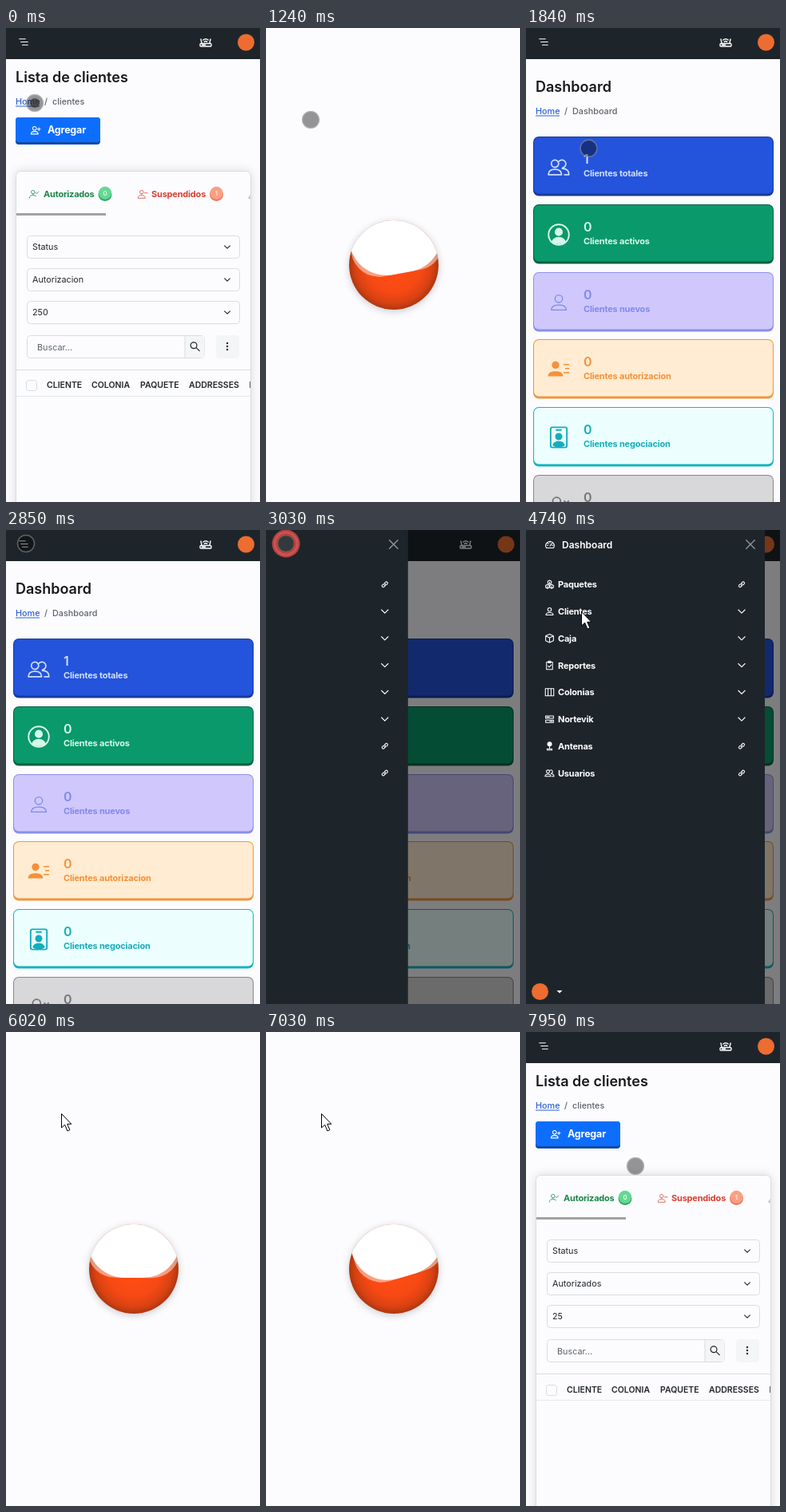
An HTML page with a canvas for the animation above (8000 ms loop, 318 by 594 pixels).

```html
<!DOCTYPE html>
<html lang="es">
<head>
<meta charset="utf-8">
<title>Clientes</title>
<style>
html, body { margin: 0; width: 318px; height: 594px; overflow: hidden; background: #fcfcff; }
canvas { display: block; width: 318px; height: 594px; }
</style>
</head>
<body>
<canvas id="stage"></canvas>
<script>
const W = 318, H = 594, LOOP = 8000;
const cv = document.getElementById('stage'), c = cv.getContext('2d');
const dpr = window.devicePixelRatio || 1;
cv.width = W * dpr;
cv.height = H * dpr;

const BG = '#fcfcff', DARK = '#1d252b', INK = '#212529', EDGE = '#d9dce0', PALE = '#f4f5f7', MARK = '#ee6c30';

const ICONS = {
  person: 'M8 8a3 3 0 1 0 0-6a3 3 0 0 0 0 6zM2 14c0-3 2.5-4 6-4s6 1 6 4z',
  people: 'M5.3 8.3a2.6 2.6 0 1 0 0-5.2a2.6 2.6 0 0 0 0 5.2zM.6 13.6c0-2.8 1.8-3.8 4.7-3.8s4.7 1 4.7 3.8zM8.2 4a2.8 2.8 0 1 1 2.6 4.600M10.500 9.200c3 0 4.800 1.200 4.800 4.400h-3.200',
  check: 'M6.5 8a2.8 2.8 0 1 0 0-5.6a2.8 2.8 0 0 0 0 5.6zM1 14c0-3 2-4 5.5-4c2 0 3.5 .4 4.5 1.2M10.5 6l1.5 1.5l3-3',
  minus: 'M6.5 8a2.8 2.8 0 1 0 0-5.6a2.8 2.8 0 0 0 0 5.6zM1 14c0-3 2-4 5.5-4s5.5 1 5.5 4zM11 6.5h4.5',
  plus: 'M6.5 8a2.8 2.8 0 1 0 0-5.6a2.8 2.8 0 0 0 0 5.6zM1 14c0-3 2-4 5.5-4s5.5 1 5.5 4zM11 6.5h4.5M13.2 4.2v4.5',
  cross: 'M6.5 8a2.8 2.8 0 1 0 0-5.6a2.8 2.8 0 0 0 0 5.6zM1 14c0-3 2-4 5.5-4s5.5 1 5.5 4zM12 5l3 3M15 5l-3 3',
  ring: 'M15.3 8a7.3 7.3 0 1 0-14.6 0a7.3 7.3 0 0 0 14.6 0z',
  bust: 'M8 9a3 3 0 1 0 0-6a3 3 0 0 0 0 6zM2.8 13.4c.7-2.6 2.5-3.6 5.2-3.6s4.5 1 5.2 3.6c-2.8 2.2-7.6 2.2-10.4 0z',
  badge: 'M3.4 .8h9.2q1.2 0 1.2 1.2v12q0 1.200-1.200 1.200h-9.200q-1.200 0-1.200-1.200v-12q0-1.200 1.200-1.200zM6.300 2.700h3.400',
  gauge: 'M2.5 13a6.5 6.5 0 1 1 11 0zM8 10l3-4M8 3.5v1.5M3.5 9h1.5M11.5 9h1.5M4.8 5.5l1 1',
  boxes: 'M8 1l3 1.5v3.5l-3 1.5l-3-1.5v-3.5zM4.5 8l3 1.5v3.5l-3 1.5l-3-1.5v-3.5zM11.5 8l3 1.5v3.5l-3 1.5l-3-1.5v-3.5zM4.5 11v3M11.5 11v3M8 4v3',
  box: 'M8 1l6.5 3v8l-6.5 3l-6.5-3v-8zM1.5 4l6.5 3l6.5-3M8 7v8',
  clip: 'M3 2.5h10v12.5h-10zM6 1h4v3h-4zM5.5 9l2 2l3.5-4',
  map: 'M1 2h14v12h-14zM5.5 2v12M10.5 2v12',
  server: 'M1.5 2.500h13v4h-13zM1.500 9.500h13v4h-13zM3.500 4.500h4M8.500 11.500h4',
  pole: 'M8 7v5M4 12.5h8v2h-8z',
  link: 'M7 9.5a2.8 2.8 0 0 1 0-4l2.5-2.5a2.8 2.8 0 0 1 4 4l-1.5 1.5M9 6.5a2.8 2.8 0 0 1 0 4l-2.5 2.5a2.8 2.8 0 0 1-4-4l1.5-1.5',
  chev: 'M2 5l6 6l6-6',
  close: 'M2 2l12 12M14 2l-12 12',
  menu: 'M1 3h10M3.5 8h11.5M6 13h9',
  router: 'M2 10.500h12q1 0 1 1v1.500q0 1-1 1h-12q-1 0-1-1v-1.500q0-1 1-1zM3.500 12.300h4M3 10l-1-5M13 10l1-5M6.300 8.300a2.500 2.500 0 0 1 3.400 0M4.800 6a5 5 0 0 1 6.400 0',
  lens: 'M11 6.5a4.8 4.8 0 1 0-9.6 0a4.8 4.8 0 0 0 9.6 0zM10 10l5 5'
};
for (const k in ICONS) ICONS[k] = new Path2D(ICONS[k]);
const ARROW = new Path2D('M0 0V17.5L4.2 13.8L7.4 21.5L10.4 20.2L7.2 12.8H12.3Z');

const clamp = v => Math.max(0, Math.min(1, v));
const ease = v => { v = clamp(v); return v * v * (3 - 2 * v); };

function text(s, x, y, size, weight, col, align = 'left') {
  c.font = `${weight} ${size}px Inter, sans-serif`;
  // bold interface labels are set slightly tight
  c.letterSpacing = weight == 700 ? '-0.2px' : '0px';
  c.textAlign = align;
  c.fillStyle = col;
  c.fillText(s, x, y);
}
function icon(name, x, y, size, col, lw = 1.3, fill = false) {
  c.save();
  c.translate(x - size / 2, y - size / 2);
  c.scale(size / 16, size / 16);
  c.lineWidth = lw;
  c.lineCap = c.lineJoin = 'round';
  c.strokeStyle = c.fillStyle = col;
  if (fill) c.fill(ICONS[name]); else c.stroke(ICONS[name]);
  c.restore();
}
function rect(x, y, w, h, col) {
  c.fillStyle = col;
  c.fillRect(x, y, w, h);
}
function round(x, y, w, h, r, fill, stroke) {
  c.beginPath();
  c.roundRect(x, y, w, h, r);
  if (fill) { c.fillStyle = fill; c.fill(); }
  if (stroke) { c.strokeStyle = stroke; c.lineWidth = 1; c.stroke(); }
}
function disc(x, y, r, col) {
  c.beginPath();
  c.arc(x, y, r, 0, 7);
  c.fillStyle = col;
  c.fill();
}

function shell() {
  rect(0, 0, W, H, BG);
  rect(0, 0, W, 39, DARK);
  icon('menu', 22, 17.5, 12, '#ffffff', 1.5);
  icon('router', 250, 17, 16, '#ffffff', 1.4);
  disc(300.5, 18, 10.5, MARK);
}
function crumbs(title, last, ty, by) {
  text(title, 12, ty, 18, 600, '#16181c');
  text('Home', 12, by, 10.8, 500, '#2f62d8');
  rect(12, by + 1.5, 30, 1, '#2f62d8');
  text('/', 48, by, 10.8, 500, '#5c636a');
  text(last, 58, by, 10.8, 500, '#5c636a');
}

function badge(x, label, light, deep) {
  disc(x, 208.5, 8.5, deep);
  disc(x, 206.8, 8, light);
  text(label, x, 209.7, 8, 500, '#ffffff', 'center');
}
function select(y, label) {
  round(26.5, y + .5, 266, 28, 4, BG, EDGE);
  text(label, 33, y + 18.3, 10.8, 400, INK);
  icon('chev', 277, y + 14.5, 9, INK, 2);
}
function listPage(status, size, shift) {
  shell();
  crumbs('Lista de clientes', 'clientes', 68, 96);
  round(12, 112, 106, 34, 4, '#0b4aa8');
  round(12, 112, 106, 31, 4, '#0d6efd');
  icon('plus', 37, 128, 13, '#ffffff');
  text('Agregar', 52, 132.2, 12.5, 700, '#ffffff');

  c.save();
  c.shadowColor = 'rgba(0,0,0,.15)';
  c.shadowBlur = 13 * dpr;
  round(12.5, 179.5, 294, 440, 6, BG);
  c.restore();
  round(12.5, 179.5, 294, 440, 6, BG, EDGE);

  c.save();
  c.beginPath();
  c.rect(13, 180, 293, H);
  c.clip();
  icon('check', 35, 208, 13, '#3f9a6c', 1.2);
  text('Autorizados', 47, 212, 11, 700, '#198745');
  badge(124, '0', '#62d992', '#2fa866');
  icon('minus', 171, 208, 13, '#de6a5c', 1.2);
  text('Suspendidos', 182, 212, 11, 700, '#dc4030');
  badge(263.5, '1', '#fb9f82', '#ea7a5e');
  icon('person', 309, 208, 13, '#9a9da0', 1.2);
  rect(13, 232, 112, 3, '#a2a2a2');

  select(260, 'Status');
  select(301, status);
  select(342, size);
  round(26.5, 385.5, 222, 28, 4, BG, EDGE);
  rect(224, 386, 24.5, 27, PALE);
  rect(223.5, 386, 1, 27, EDGE);
  text('Buscar...', 39, 404, 10.8, 400, '#5c636a');
  icon('lens', 236.5, 399, 13, INK, 1.5);
  round(263, 385, 29, 29, 4, PALE);
  for (let i = -1; i < 2; i++) disc(277, 399 + i * 4, 1.2, INK);

  rect(13, 428, 293, 1, EDGE);
  rect(13, 461, 293, 1, '#e6e8ea');
  round(25.5, 441.5 + shift, 13, 13, 3, BG, EDGE);
  const heads = { CLIENTE: 51, COLONIA: 107, PAQUETE: 168, ADDRESSES: 229, IP: 304.5 };
  for (const h in heads) text(h, heads[h], 451.2 + shift, 10.5, 600, INK);
  c.restore();
}

// number, label, fill, edge, ink
const CARDS = [
  ['1', 'totales', '#2453dc', '#183a9c', '#cfdfff'],
  ['0', 'activos', '#0a996a', '#06603f', '#d6f7ea'],
  ['0', 'nuevos', '#d0c8fc', '#8a90e8', '#8289ee'],
  ['0', 'autorizacion', '#ffecd2', '#f0963c', '#f5903a'],
  ['0', 'negociacion', '#ecfffe', '#14b4c4', '#12aebd'],
  ['0', 'suspendidos', '#d8d8da', '#86878c', '#74757c']
];
function dashboard(dim) {
  shell();
  crumbs('Dashboard', 'Dashboard', 80, 108);
  CARDS.forEach(([num, name, fill, edge, ink], i) => {
    const y = Math.round(136 + i * 84.75), x = 41, my = y + 38;
    round(9, y, 301, 74.5, 7, edge);
    round(10, y + 1, 299, 70.5, 6, fill);
    text(num, 72, y + 34, 16, 600, ink);
    text('Clientes ' + name, 72, y + 50, 11, 700, ink);
    if (i == 0) icon('people', x, my, 28, ink, 1);
    if (i == 1) {
      icon('ring', x, my, 28, ink, 1.1);
      icon('bust', x, my, 27, ink, 1, true);
    }
    if (i == 2) icon('person', x, my, 25, ink, .9);
    if (i == 3) {
      icon('person', 37, my - 1, 25, ink, 1, true);
      rect(47, my - 7, 7, 1.5, ink);
      rect(49, my - 2, 5, 1.5, ink);
      rect(47, my + 3, 7, 1.5, ink);
    }
    if (i == 4) {
      icon('badge', x, my, 28, ink, 1.1);
      icon('bust', x, my + 2, 24, ink, 1, true);
    }
    if (i == 5) icon('cross', x, my, 28, ink, 1);
  });
  rect(0, 0, W, H, `rgba(0,0,0,${dim / 2})`);
}

const MENU = [
  ['Paquetes', 'boxes', 1], ['Clientes', 'person'], ['Caja', 'box'], ['Reportes', 'clip'],
  ['Colonias', 'map'], ['Nortevik', 'server'], ['Antenas', 'pole', 1], ['Usuarios', 'people', 1]
];
function sidebar(open) {
  const ink = '#ffffff';
  c.save();
  c.translate(-299 * (1 - open), 0);
  rect(0, 0, 299, H, DARK);
  icon('gauge', 30, 18.5, 13, ink);
  text('Dashboard', 45, 23, 12, 600, ink);
  icon('close', 281, 18, 14, '#92979b', 1.6);
  MENU.forEach(([name, ic, link], i) => {
    const y = 68.3 + i * 33.75;
    icon(ic, 29.5, y, 12, ink, 1.4);
    if (ic == 'pole') disc(29.5, y - 2.5, 3, ink);
    text(name, 40, y + 4, 11, 700, ink);
    if (link) icon('link', 270, y, 9, ink, 1.9);
    else icon('chev', 270, y, 11, ink, 1.6);
  });
  disc(17.5, 578.5, 10.5, MARK);
  c.beginPath();
  c.moveTo(38.5, 577);
  c.lineTo(45.5, 577);
  c.lineTo(42, 580.5);
  c.fillStyle = ink;
  c.fill();
  c.restore();
}

function tile(angle, curve, col) {
  c.save();
  c.translate(160, 250);
  c.rotate(angle);
  round(-58, -58, 116, 116, 116 * curve, col);
  c.restore();
}
function loader(age) {
  rect(0, 0, W, H, BG);
  c.save();
  c.shadowColor = 'rgba(0,0,0,.2)';
  c.shadowBlur = 10 * dpr;
  c.shadowOffsetY = 2 * dpr;
  disc(160, 297, 56, '#ffffff');
  c.restore();
  c.save();
  c.beginPath();
  c.arc(160, 297, 56, 0, 7);
  c.clip();
  const g = c.createRadialGradient(160, 297, 12, 160, 297, 57);
  g.addColorStop(0, '#ff4c14');
  g.addColorStop(.5, '#f64914');
  g.addColorStop(.8, '#d94212');
  g.addColorStop(1, '#a83610');
  rect(100, 240, 120, 120, g);
  const turn = Math.PI * 2 * age / 5000;
  tile(turn, .3, 'rgba(255,245,240,.5)');
  tile(turn, .4, '#ffffff');
  c.restore();
}

const PATH = [
  [0, 36, 94], [400, 36, 94], [1240, 56, 115], [1700, 84, 163], [2480, 20, 22], [2620, 20, 22],
  [2800, 25, 17], [3120, 25, 17], [3400, 59, 106], [3450, 70, 117], [3680, 70, 117],
  [3980, 83, 106], [4330, 66, 97], [4740, 66, 97], [7700, 69, 102], [7950, 137, 168], [LOOP, 137, 168]
];
function place(t) {
  let i = 1;
  while (i < PATH.length - 1 && t > PATH[i][0]) i++;
  const [t0, x0, y0] = PATH[i - 1], [t1, x1, y1] = PATH[i], k = ease((t - t0) / (t1 - t0));
  return [x0 + (x1 - x0) * k, y0 + (y1 - y0) * k];
}
function ripple(x, y, age) {
  if (age < 0 || age > 330) return;
  if (age < 50) return disc(x, y, 6, 'rgba(50,50,50,.7)');
  c.save();
  c.globalAlpha = 1 - clamp((age - 190) / 140);
  disc(x, y, 11, 'rgba(110,110,110,.4)');
  c.beginPath();
  c.arc(x, y, 14 * clamp(age / 130), 0, 7);
  c.lineWidth = 7;
  c.strokeStyle = '#b8403f';
  c.stroke();
  c.lineWidth = 3;
  c.strokeStyle = '#c95452';
  c.stroke();
  c.restore();
}
function pointer(t) {
  if (t >= 4740 && t < 7720) {
    c.save();
    c.translate(69.5, 102.5);
    c.fillStyle = '#ffffff';
    c.strokeStyle = '#000000';
    c.lineWidth = 1;
    c.fill(ARROW);
    c.stroke(ARROW);
    c.restore();
    return;
  }
  const [x, y] = place(t);
  c.save();
  c.globalCompositeOperation = 'multiply';
  disc(x, y, 11, '#969696');
  c.restore();
  c.beginPath();
  c.arc(x, y, 10.5, 0, 7);
  c.lineWidth = 1.5;
  c.strokeStyle = 'rgba(205,205,205,.4)';
  c.stroke();
  ripple(x, y, t + 20);
  ripple(x, y, t - 2890);
  // the last press stays frozen until the arrow takes over
  if (t < 4740) ripple(x, y, Math.min(t - 4310, 140));
}

function draw(t) {
  c.setTransform(dpr, 0, 0, dpr, 0, 0);
  if (t < 130) listPage('Autorizacion', '250', 0);
  else if (t < 1420) loader(t - 130);
  else if (t < 6015) {
    dashboard(clamp((t - 2862) / 150));
    const open = ease((t - 2862) / 300);
    if (open > 0) sidebar(open);
  }
  else if (t < 7250) loader(t - 6015);
  else listPage('Autorizados', '25', 1);
  pointer(t);
}
function tick() {
  draw(performance.now() % LOOP);
  requestAnimationFrame(tick);
}
tick();
</script>
</body>
</html>
```
